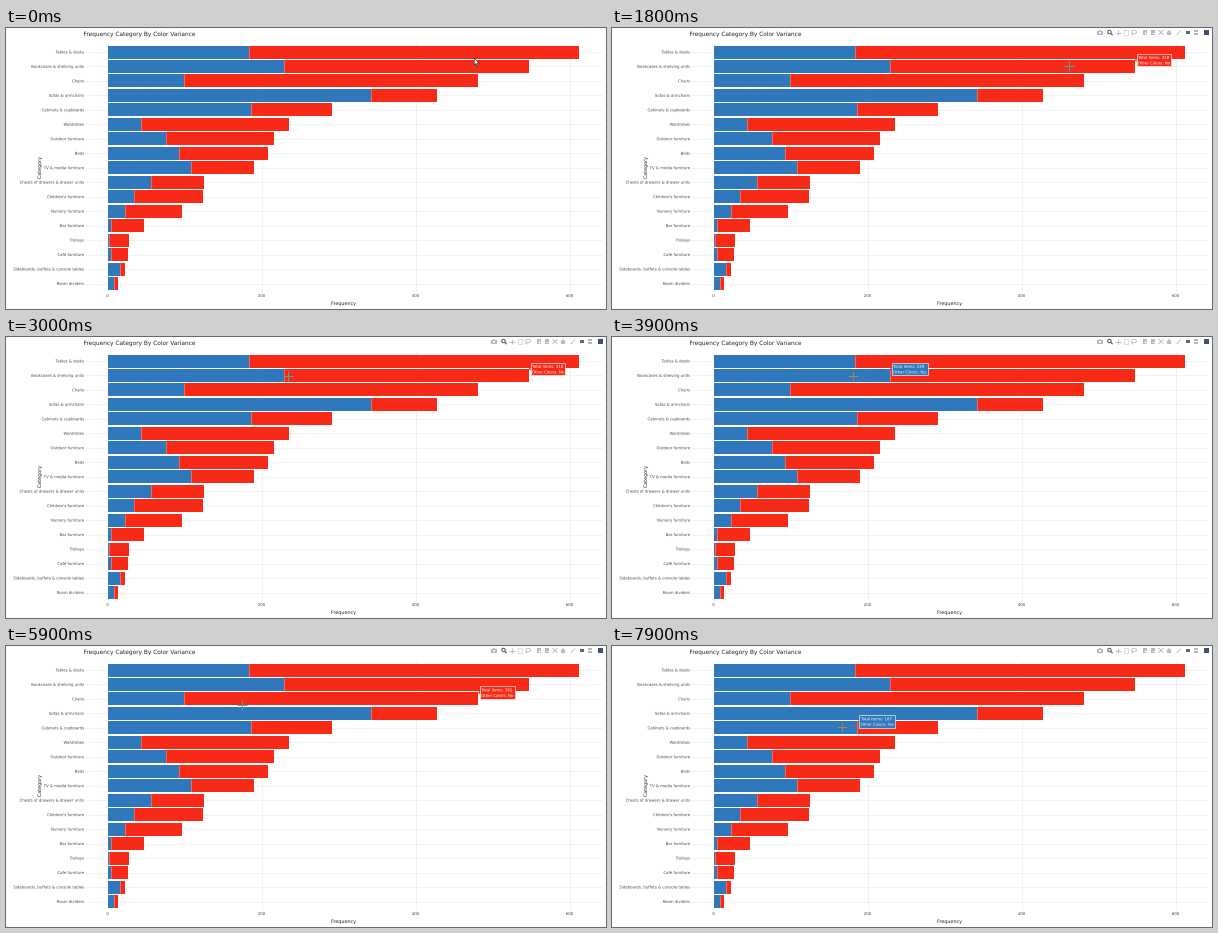
These frames come from a looping animation (600x281 px, 8 s). A matplotlib script:

```python
import matplotlib.pyplot as plt
import numpy as np
from matplotlib.animation import FuncAnimation
from matplotlib.patches import Circle, Ellipse, PathPatch, Polygon, Rectangle
from matplotlib.textpath import TextPath
from matplotlib.transforms import Affine2D

W, H, DPI = 600, 281, 100
STEP, FRAMES = 100, 80
PX = 72 / DPI

BLUE, RED = "#2e78bb", "#f62a17"
GRID, ICON, ICON_ON = "#ececec", "#b4b8be", "#5f666e"
X0, UNIT = 101.5, 0.77
ROW0, PITCH, HALF = 24.0, 14.47, 6.5

# label, items with other colours, items without
ROWS = [
    ("Tables & desks", 184, 428),
    ("Bookcases & shelving units", 229, 318),
    ("Chairs", 99, 382),
    ("Sofas & armchairs", 342, 86),
    ("Cabinets & cupboards", 187, 105),
    ("Wardrobes", 43, 193),
    ("Outdoor furniture", 76, 140),
    ("Beds", 93, 115),
    ("TV & media furniture", 109, 81),
    ("Chests of drawers & drawer units", 56, 69),
    ("Children's furniture", 35, 89),
    ("Nursery furniture", 23, 74),
    ("Bar furniture", 5, 42),
    ("Trolleys", 2, 26),
    ("Café furniture", 5, 21),
    ("Sideboards, buffets & console tables", 16, 7),
    ("Room dividers", 8, 5),
]

# pointer path: time in ms, x, y
PATH = np.array([
    (0, 468, 33), (300, 468, 36), (1500, 467, 37), (1800, 457, 38),
    (2200, 440, 38.5), (2600, 411, 39), (2800, 350, 39), (3000, 282, 39),
    (3200, 241, 39), (4200, 241, 39), (4600, 240, 50), (5200, 240, 51),
    (5500, 240, 51), (6300, 232, 67), (6900, 232, 67.3), (7100, 231, 68.5),
    (7200, 231, 68.5), (7900, 230, 81),
])

fig = plt.figure(figsize=(W / DPI, H / DPI), dpi=DPI, facecolor="white")
ax = fig.add_axes([0, 0, 1, 1])
ax.set_xlim(0, W)
ax.set_ylim(H, 0)
ax.axis("off")


def rect(x, y, w, h, color, z=2, **kw):
    return ax.add_patch(Rectangle((x, y), w, h, fc=color, lw=0, zorder=z, **kw))


def line(xs, ys, color, width=1.0, z=1):
    return ax.plot(xs, ys, color=color, lw=width * PX, zorder=z,
                   solid_capstyle="butt")[0]


def set_text(patch, s, x, y, size, align=0.0, angle=0):
    """Put s on the baseline y; align 0, 0.5 or 1 is left, centre or right."""
    path = TextPath((0, 0), s, size=size, prop={"family": "DejaVu Sans"})
    box = path.get_extents()
    move = (Affine2D().translate(-box.x0 - align * box.width, 0).scale(1, -1)
            .rotate_deg(-angle).translate(x, y))
    patch.set_path(path)
    patch.set_transform(move + ax.transData)
    return box.width


def text(s, x, y, size, color, align=0.0, angle=0, z=5):
    patch = PathPatch(TextPath((0, 0), "-", size=1), fc=color, lw=0, zorder=z)
    ax.add_artist(patch)
    set_text(patch, s, x, y, size, align, angle)
    return patch


def row_y(i):
    return ROW0 + PITCH * i


def draw_chart():
    for v in (0, 200, 400, 600):
        x = X0 + v * UNIT
        line([x, x], [15, 264], GRID, 0.7)
        text(str(v), x, 269, 3.9, "#444444", 0.5)
    for i, (name, other, single) in enumerate(ROWS):
        y = row_y(i)
        split = X0 + other * UNIT
        line([79, 596], [y, y], GRID, 0.7)
        rect(X0, y - HALF, other * UNIT, 2 * HALF, BLUE)
        rect(split, y - HALF, single * UNIT, 2 * HALF, RED)
        line([split, split], [y - HALF, y + HALF], (1, 1, 1, 0.4), 0.7, 3)
        text(name, 78, y + 1.4, 3.87, "#444444", 1)
    text("Frequency Category By Color Variance", 78, 8, 5.83, "#222222")
    text("Frequency", 337.7, 277, 4.85, "#222222", 0.5)
    text("Category", 35, 140, 4.85, "#222222", 0.5, 90)
    line([599.5, 599.5], [0, H], "#c4c4c4")


def draw_toolbar():
    y = 4.5
    parts = []

    def block(x, top, w, h, color=ICON):
        parts.append(rect(x, top, w, h, color))

    def stroke(xs, ys, color=ICON, width=0.9):
        parts.append(line(xs, ys, color, width, 3))

    def ring(shape):
        parts.append(ax.add_patch(shape))

    # camera
    block(485.3, 2.9, 5.4, 3.8)
    block(487, 2.2, 2, 1)
    ring(Circle((488, 4.8), 1.1, fc="white", lw=0, zorder=3))
    # magnifier
    ring(Circle((497.4, 4), 1.7, fc="none", ec=ICON_ON, lw=1.1 * PX, zorder=3))
    stroke([498.6, 500.6], [5.2, 7.2], ICON_ON, 1.3)
    # pan
    stroke([503.2, 508.8], [y, y])
    stroke([506, 506], [1.7, 7.3])
    # box select and lasso
    ring(Rectangle((511.8, 2.4), 4.4, 4.2, fc="none", ec=ICON, lw=0.8 * PX,
                   ls=(0, (1.5, 1)), zorder=3))
    ring(Ellipse((522, 4), 5, 3.2, fc="none", ec=ICON, lw=0.8 * PX, zorder=3))
    stroke([520.5, 520, 521], [5.3, 6.4, 7.2])
    # zoom in and out
    for x in (533, 541):
        block(x - 2.4, 2.1, 4.8, 4.8)
        stroke([x - 1.5, x + 1.5], [y, y], "white", 0.8)
    stroke([533, 533], [3, 6], "white", 0.8)
    # autoscale
    for s in (-1, 1):
        stroke([549 - 2.4, 549 + 2.4], [y - 2.4 * s, y + 2.4 * s])
    # reset
    ring(Polygon([(554.2, 4.8), (557, 2), (559.8, 4.8)], fc=ICON, lw=0, zorder=3))
    block(555.1, 4.6, 3.8, 2.4)
    # spike lines
    stroke([564.8, 569.2], [6.6, 2.4], width=0.7)
    block(564.6, 5.6, 1.4, 1.4)
    # hover modes
    block(573.5, 3, 4.6, 2.8, ICON_ON)
    block(581.8, 2.4, 4.4, 1.9)
    block(581.8, 4.9, 4.4, 1.9)
    # plain badge
    block(591.5, 2, 5, 5, "#3f4f75")
    return parts


draw_chart()
toolbar = draw_toolbar()

arrow = ax.add_patch(Polygon(
    [(468.2, 29.8), (468.2, 37), (469.8, 35.7), (471, 38.4), (472.1, 37.9),
     (470.9, 35.3), (473, 35.1)],
    fc="white", ec="#333333", lw=0.7 * PX, zorder=9))
cross = [line([0, 0], [0, 0], "k", 1, 9) for _ in range(2)]

tip_nose = ax.add_patch(Polygon([(0, 0)] * 3, lw=0, zorder=6))
tip_box = ax.add_patch(Rectangle((0, 0), 1, 1, ec="white", lw=0.6 * PX, zorder=7))
tip_lines = [text("-", 0, 0, 3.87, "white", z=8) for _ in range(2)]
tip = [tip_nose, tip_box, *tip_lines]


def inverse(color):
    rgb = np.array(plt.matplotlib.colors.to_rgb(color))
    return tuple(0.7 * (1 - rgb) + 0.3 * rgb)


def show_tip(row, is_other):
    _, other, single = ROWS[row]
    end = X0 + (other if is_other else other + single) * UNIT
    count, answer = (other, "Yes") if is_other else (single, "No")
    color = BLUE if is_other else RED
    x, y = end + 2, row_y(row) - HALF
    widths = [
        set_text(tip_lines[0], f"Total items: {count}", x + 1.5, y - 1.1, 3.87),
        set_text(tip_lines[1], f"Other Colors: {answer}", x + 1.5, y + 4.4, 3.87),
    ]
    tip_box.set_bounds(x, y - 6, max(widths) + 3, 12.5)
    tip_box.set_facecolor(color)
    tip_nose.set_xy([(end, y), (x, y - 2), (x, y + 2)])
    tip_nose.set_facecolor(color)


def draw(i):
    t = i * STEP
    x, y = (np.interp(t, PATH[:, 0], PATH[:, k]) for k in (1, 2))
    row = int(round((y - ROW0) / PITCH))
    is_other = x < X0 + ROWS[row][1] * UNIT

    for part in toolbar:
        part.set_alpha(min(t / 400, 1))
    arrow.set_visible(t < 200)

    cross[0].set_data([x - 5.3, x + 5.3], [y, y])
    cross[1].set_data([x, x], [y - 5.3, y + 5.3])
    for arm in cross:
        arm.set_color(inverse(BLUE if is_other else RED))
        arm.set_visible(t >= 200)

    show_tip(row, is_other)
    for part in tip:
        part.set_visible(t >= 300)
    return [*toolbar, arrow, *cross, *tip]


anim = FuncAnimation(fig, draw, frames=FRAMES, interval=STEP, repeat=True,
                     repeat_delay=0, blit=False)
plt.show()
```
